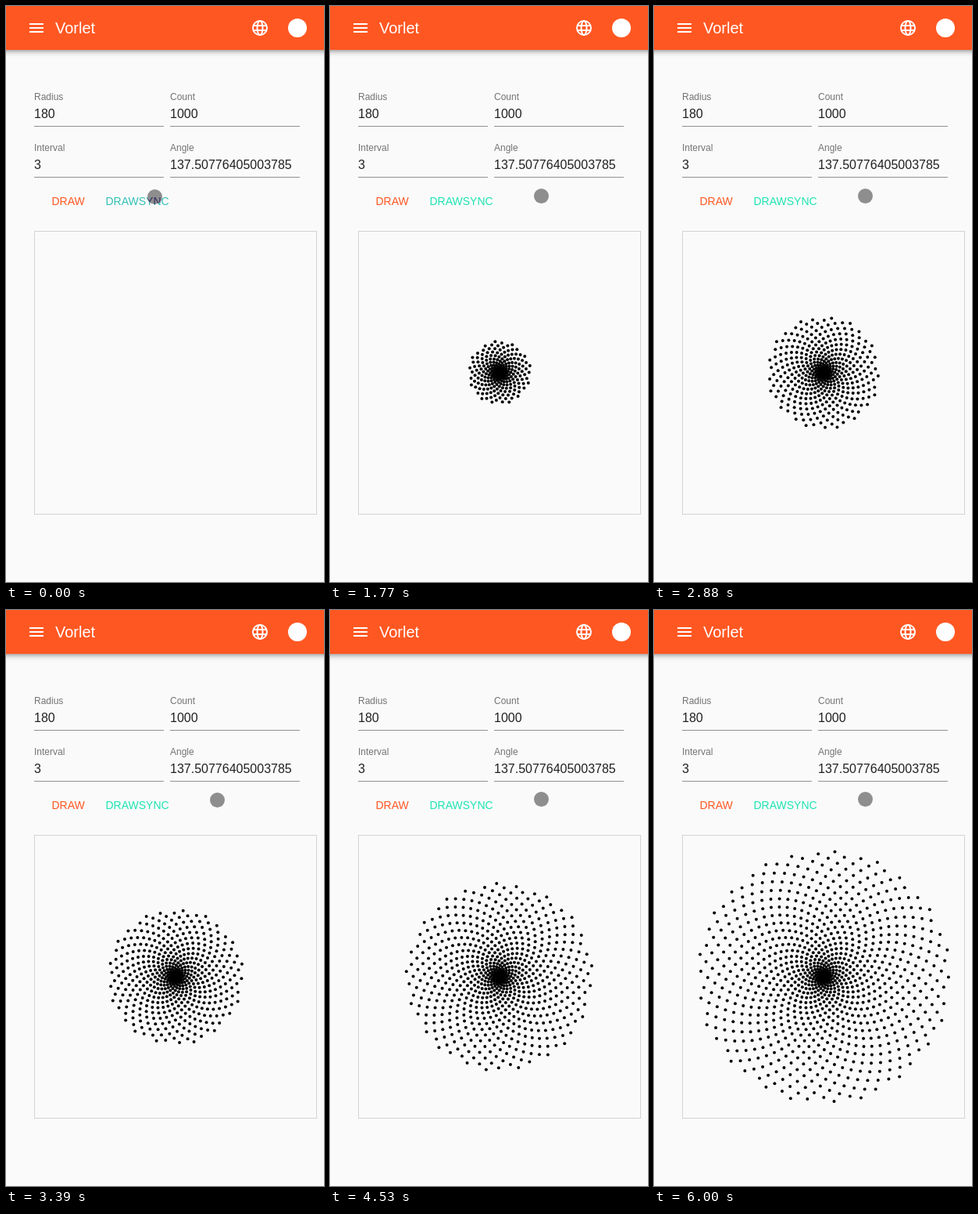
Recreate the animation shown at these times as an HTML page with a canvas. Size 407x735 px, loop 6.43 s.

```html
<!DOCTYPE html>
<html lang="en">
<head>
<meta charset="utf-8">
<title>Vorlet</title>
<style>
  html, body { margin: 0; width: 100%; height: 100%; overflow: hidden; background: #fafafa; }
  body { position: relative; }
  header {
    position: absolute; top: 0; left: -20px; right: -20px; height: 56px; background: #ff5722;
    box-shadow: 0 2px 4px -1px rgba(0,0,0,.2), 0 4px 5px rgba(0,0,0,.14), 0 1px 10px rgba(0,0,0,.12);
  }
  svg, canvas { position: absolute; top: 0; left: 0; width: 407px; height: 735px; display: block; }
  text { font-family: "Liberation Sans", Arial, sans-serif; font-size: 16px; fill: rgba(0,0,0,.87); }
  .title { font-size: 20px; fill: #fff; }
  .label { font-size: 12px; fill: rgba(0,0,0,.54); }
  .button { font-size: 14px; fill: #ff5722; }
</style>
</head>
<body>
<header></header>
<svg viewBox="0 0 407 735">
  <path d="M30 22h18v2H30zM30 27h18v2H30zM30 32h18v2H30z" fill="#fff"/>
  <text class="title" x="63" y="35">Vorlet</text>
  <g fill="none" stroke="#fff" stroke-width="2">
    <circle cx="325" cy="28" r="9"/>
    <ellipse cx="325" cy="28" rx="3.5" ry="9"/>
    <path d="M316.5 25h17M316.5 31h17"/>
  </g>
  <circle cx="373" cy="28" r="12" fill="#fff"/>

  <text class="label" x="36" y="120">Radius</text>
  <text x="36" y="143">180</text>
  <text class="label" x="210" y="120">Count</text>
  <text x="210" y="143">1000</text>
  <text class="label" x="36" y="185">Interval</text>
  <text x="36" y="208">3</text>
  <text class="label" x="210" y="185">Angle</text>
  <text x="210" y="208">137.50776405003785</text>
  <path d="M36 153h166v1H36zM210 153h166v1H210zM36 218h166v1H36zM210 218h166v1H210z" fill="rgba(0,0,0,.42)"/>

  <text class="button" x="58.5" y="254">DRAW</text>
  <text class="button" id="sync" x="127.5" y="254">DRAWSYNC</text>
  <rect x="36.5" y="287.5" width="361" height="361" fill="none" stroke="#d3d3d3"/>
</svg>
<canvas id="stage"></canvas>
<script>
const LOOP = 6430;
const COUNT = 1000;
const RADIUS = 180 * 0.9;
const ANGLE = 137.50776405003785 * Math.PI / 180;
const CENTER = { x: 217, y: 468 };
const DRAW_START = 378.1;
const DOT_TIME = 5.612;

// The screen refreshes in even steps between these times.
const FIRST = 320;
const LAST = 6000;
const STEP = (LAST - FIRST) / 89;
const LEAD = 20;

const canvas = document.getElementById('stage');
const sync = document.getElementById('sync');
const ctx = canvas.getContext('2d');
const scale = window.devicePixelRatio || 1;
canvas.width = Math.round(407 * scale);
canvas.height = Math.round(735 * scale);
ctx.scale(scale, scale);

const clamp = (v, lo, hi) => Math.min(hi, Math.max(lo, v));
const mix = (a, b, p) => a + (b - a) * p;
const progress = (t, from, to) => clamp((t - from) / (to - from), 0, 1);
const smooth = p => p * p * (3 - 2 * p);

function refreshTime(t) {
  if (t < FIRST) return 0;
  const k = Math.floor((t - FIRST + LEAD) / STEP);
  return Math.min(t, FIRST + k * STEP, LAST);
}

function disc(x, y, r) {
  ctx.beginPath();
  ctx.arc(x, y, r, 0, 2 * Math.PI);
}

function drawDots(t) {
  const n = clamp(Math.floor((t - DRAW_START) / DOT_TIME), 0, COUNT);
  ctx.fillStyle = '#000';
  for (let i = 1; i <= n; i++) {
    const r = RADIUS * i / COUNT;
    disc(CENTER.x + r * Math.cos(i * ANGLE), CENTER.y + r * Math.sin(i * ANGLE), 2);
    ctx.fill();
  }
}

function drawPointer(t) {
  const leave = smooth(progress(t, 440, 890));
  const settle = smooth(progress(t, 1010, 1400));
  const drift = progress(t, 3400, 3460);
  ctx.save();
  disc(190.5 + 74 * leave + 6 * settle, 243.5 - 5 * leave + 4 * settle - drift, 9.5);
  ctx.fillStyle = '#8e8e8e';
  ctx.fill();
  // The label shows dark through the pointer.
  ctx.clip();
  ctx.font = '14px "Liberation Sans", Arial, sans-serif';
  ctx.fillStyle = '#302c62';
  ctx.fillText('DRAWSYNC', 127.5, 254);
  ctx.restore();
}

function tintButton(t) {
  const p = progress(t, 300, 600);
  const rgb = [mix(52, 29, p), mix(192, 228, p), mix(182, 178, p)].map(Math.round);
  sync.style.fill = `rgb(${rgb})`;
}

function render(now) {
  const t = refreshTime(now % LOOP);
  ctx.clearRect(0, 0, 407, 735);
  drawDots(t);
  drawPointer(t);
  tintButton(t);
}

const start = performance.now();
function loop() {
  render(performance.now() - start);
  requestAnimationFrame(loop);
}
loop();
</script>
</body>
</html>
```
